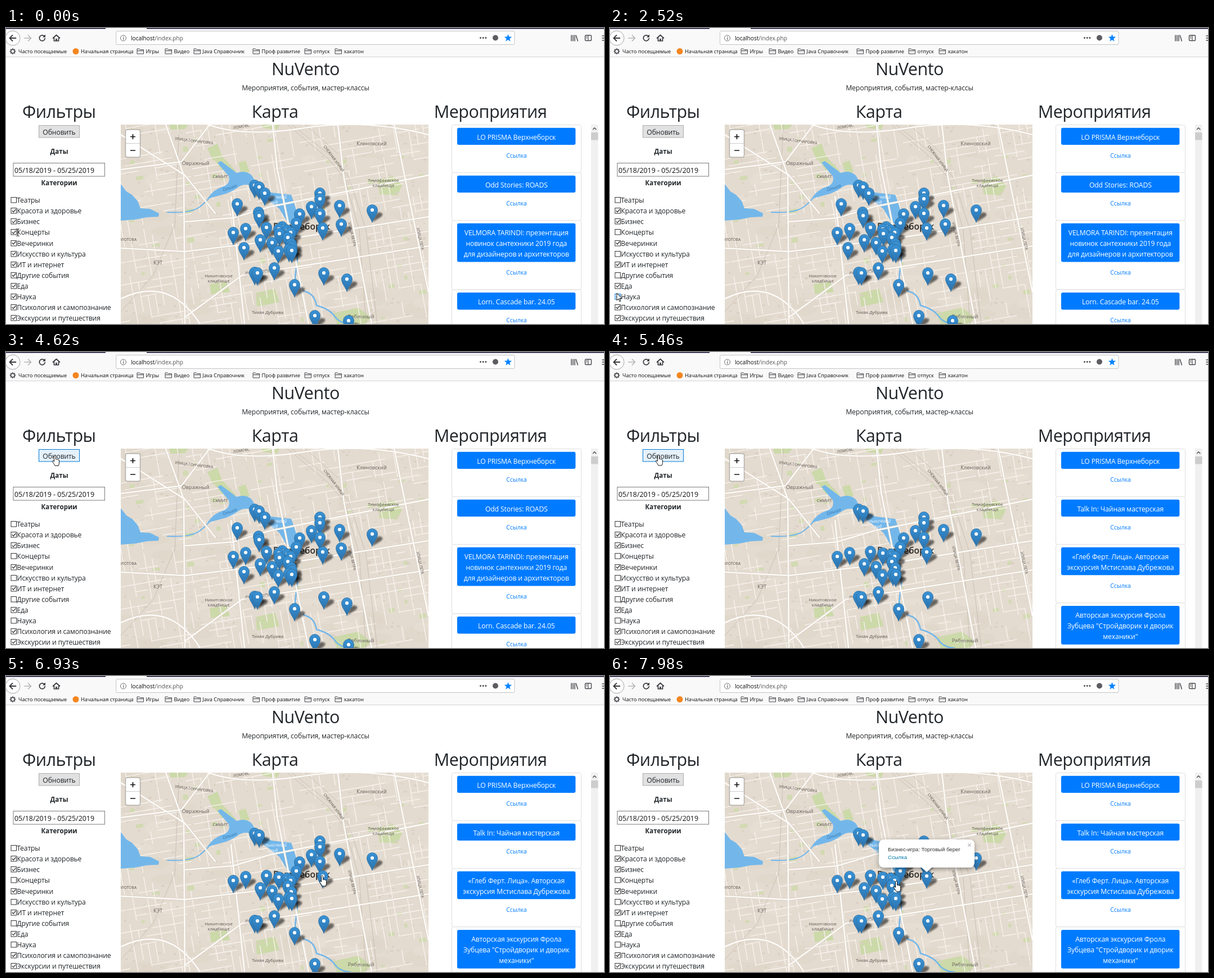
Animation of 1063 by 527 pixels, one loop 8000 ms. Source, as an HTML page:

```html
<!DOCTYPE html>
<html lang="ru">
<head>
<meta charset="utf-8">
<title>NuVento</title>
<style>
html, body { margin: 0; width: 100%; height: 100%; overflow: hidden; background: #fff; }
svg { display: block; font-family: "Open Sans", "Noto Sans", sans-serif; }
text { white-space: pre; }
.head { font-size: 30.5px; letter-spacing: -.5px; fill: #212529; }
.body { font-size: 12.2px; letter-spacing: -.13px; fill: #212529; }
.bold { font-size: 11.5px; font-weight: 700; fill: #212529; }
.date { font-size: 12.4px; fill: #111; }
.bar { font-size: 9.2px; fill: #0c0c0d; }
.url { font-size: 10.1px; fill: #555; }
.card { font-size: 12.2px; letter-spacing: -.13px; fill: #fff; }
.link { font-size: 10.4px; fill: #007bff; }
.place { font-size: 9.2px; fill: #66615c; }
.small { font-size: 7.9px; fill: #5c5751; }
.street { font-size: 6.7px; fill: #57514b; }
.water { font-size: 8.2px; font-style: italic; fill: #2f76b0; }
.pond { font-size: 8.4px; font-style: italic; fill: #eef7ff; }
.city { font-size: 15.5px; font-weight: 600; fill: #2a2826; }
.pop { font: 9.6px "Liberation Sans", Arial, sans-serif; fill: #333; }
.mid { text-anchor: middle; }
</style>
</head>
<body>
<svg id="stage" width="1063" height="527" viewBox="0 0 1063 527"></svg>
<script>
const LOOP = 8000, STEP = 70;

let seed = 41;
const rnd = () => (seed = (seed * 16807) % 2147483647) / 2147483647;
const span = (a, b) => a + rnd() * (b - a);
const times = (n, f) => Array.from({ length: n }, (_, i) => f(i)).join('');

const text = (x, y, cls, s, turn = 0) =>
  `<text class="${cls}" transform="translate(${x} ${y}) rotate(${turn})">${s}</text>`;
const rect = (x, y, w, h, attrs) => `<rect x="${x}" y="${y}" width="${w}" height="${h}" ${attrs}/>`;
const path = (d, attrs) => `<path d="${d}" ${attrs}/>`;
const line = (d, color, w) =>
  path(d, `fill="none" stroke="${color}" stroke-width="${w}" stroke-linecap="round" stroke-linejoin="round"`);

/* ---------- browser chrome ---------- */
function chrome() {
  const folder = (x, label) =>
    path(`M${x - 6} 37h4l1.5 1.5h6v7.5h-11.5zM${x - 6} 40.5h11.5`, 'fill="#eee" stroke="#4a4a4f"') +
    text(x + 9.5, 45, 'bar', label);
  const gear = times(8, i =>
    `<path d="M12 36.2v2" stroke="#4a4a4f" stroke-width="1.8" transform="rotate(${i * 45} 12 41.5)"/>`);
  const star = 'M' + Array.from({ length: 10 }, (_, i) => {
    const r = i % 2 ? 3 : 7, a = i * Math.PI / 5;
    return (892.5 + r * Math.sin(a)).toFixed(1) + ' ' + (18 - r * Math.cos(a)).toFixed(1);
  }).join('L') + 'Z';
  return rect(0, 0, 1063, 52, 'fill="#f9f9fa"') +
    rect(0, 0, 177, 1.5, 'fill="#0c0c2e"') + rect(250, 0, 813, 1.5, 'fill="#0c0c2e"') +
    rect(0, 51, 1063, 1, 'fill="#d4d4d6"') +
    '<circle cx="12" cy="18" r="13" fill="#fff" stroke="#a5a5a8"/>' +
    line('M17.5 18H7M11.5 13L6.5 18l5 5', '#38383d', 1.8) +
    line('M33 18H44M39.5 13L44.5 18l-5 5', '#b5b5b8', 1.7) +
    line('M68.2 14.6A5 5 0 1 0 69.3 18.6', '#38383d', 1.7) + path('M70 11.5v5h-5z', 'fill="#38383d"') +
    line('M83.5 18l6-5.5 6 5.5M85.5 18v5h8v-5', '#38383d', 1.7) +
    rect(88.2, 19, 2.6, 4, 'fill="#38383d"') +
    rect(195.5, 5.5, 708.5, 24, 'rx="2" fill="#fff" stroke="#c4c4c8"') +
    '<circle cx="208.5" cy="18" r="5" fill="none" stroke="#6a6a6f"/>' +
    rect(208, 17, 1.2, 4, 'fill="#6a6a6f"') + rect(208, 14.8, 1.2, 1.3, 'fill="#6a6a6f"') +
    text(222, 21.8, 'url', '<tspan fill="#0c0c0d">localhost</tspan>/index.php') +
    times(3, i => `<circle cx="${843.5 + i * 4.7}" cy="17.5" r="1.5" fill="#4a4a4f"/>`) +
    '<circle cx="870" cy="17.5" r="5" fill="#5c5c61"/>' +
    path(star, 'fill="#0a84ff"') +
    line('M1005 13v10M1008 13v10M1011 13v10M1013.3 13.3l3 9.7', '#4a4a4f', 1.5) +
    rect(1029.5, 13, 11, 9.5, 'rx="1.5" fill="none" stroke="#4a4a4f" stroke-width="1.4"') +
    line('M1035 13v9.5M1031.5 15.5h1.6M1031.5 18h1.6', '#4a4a4f', 1.1) +
    line('M1060 14h6M1060 18h6M1060 22h6', '#4a4a4f', 1.5) +
    gear + '<circle cx="12" cy="41.5" r="3.3" fill="none" stroke="#4a4a4f" stroke-width="1.6"/>' +
    text(22, 45, 'bar', 'Часто посещаемые') +
    '<circle cx="124" cy="41.5" r="5.5" fill="#f4861f"/>' +
    text(133, 45, 'bar', 'Начальная страница') +
    [[239, 'Игры'], [289, 'Видео'], [340, 'Java Справочник'], [445, 'Проф развитие'],
     [537, 'отпуск'], [591, 'хакатон']].map(f => folder(...f)).join('');
}

/* ---------- map ---------- */
const PINS = {
  stay: '442,280 450,283 558,294 558,304 543,318 593,316 651,324 522,331 558,330 516,347 563,356 ' +
    '404,364 426,357 463,355 485,358 506,364 500,360 452,377 473,382 501,373 507,384 503,394 484,397 ' +
    '508,396 477,427 442,435 447,436 513,457 565,436 549,512',
  extra: '460,294 411,313 596,349 449,328 450,334 491,354 486,366 508,389 423,391 606,447 609,521'
};

function pins() {
  const list = Object.keys(PINS).flatMap(kind =>
    PINS[kind].split(' ').map(p => ({ kind, at: p.split(',').map(Number) })));
  list.sort((a, b) => a.at[1] - b.at[1]);
  const put = id => list.map(p =>
    `<use href="#${id}" class="${p.kind}" x="${p.at[0]}" y="${p.at[1]}"/>`).join('');
  return put('shade') + put('pin');
}

function map() {
  const patches = times(70, () =>
    `<ellipse cx="${span(204, 751)}" cy="${span(172, 527)}" rx="${span(10, 35)}" ry="${span(5, 18)}"
      fill="${rnd() < .5 ? '#dfd5c9' : '#e9e1d8'}" opacity=".5"/>`);
  const greens = times(40, () => {
    const x = span(204, 745), y = span(172, 520);
    return rect(x, y, span(4, 15), span(3, 10), `rx="2" fill="#d2daB2" transform="rotate(-10 ${x} ${y})"`);
  });
  const houses = times(300, () => rect(span(204, 745), span(172, 522), span(2, 6), span(1.5, 4), 'fill="#dacfc3"'));
  const streets = 'M' + Array.from({ length: 620 }, () => {
    const x = 130 + 13 * Math.floor(span(0, 52)), y = 110 + 13 * Math.floor(span(0, 40));
    const len = Math.round(span(14, 62));
    return `${x} ${y}` + (rnd() < .5 ? `h${len}` : `v${len}`);
  }).join('M');
  const avenues = ['M284 172L316 262L318 527', 'M204 252L312 238L362 172', 'M318 345L404 338L470 318L751 262',
    'M204 392L318 398L500 376L751 336', 'M318 515L420 440L600 412L751 388', 'M474 172L482 250L538 527',
    'M590 172L600 262L650 527', 'M690 172L716 300L751 470', 'M360 172Q420 195 530 178T751 190',
    'M204 482Q290 440 345 527', 'M400 300L424 527', 'M204 190L318 262L372 330'].join('');
  const parks = ['M290 172h34l-6 8-26 1z', 'M358 214l18-8 8 22-16 8z', 'M413 240l13-4 7 20-14 6z',
    'M454 172h32l-4 9-26-3z', 'M660 270l28-6 16 16-8 18-32-2z', 'M444 472l34-8 8 24-40 8z',
    'M580 508l46-10 24 18-12 11h-50z', 'M362 456l30-4 6 18-34 4z',
    'M385 255l-16-22 14-6 26 28z'].map(d => path(d, 'fill="#ccd9a9"')).join('');
  const water =
    path('M204 278L214 291L224 297L234 308L239 321L256 322L272 330L271 336L250 337L230 341L204 343Z', 'fill="#73b7ea"') +
    line('M287 328Q330 330 345 318T366 296', '#73b7ea', 2.2) +
    path('M358 304Q368 288 384 283T396 264L376 240L382 237L410 258Q428 252 438 264L446 280L472 293L507 297Q515 318 522 345L510 352L498 342L486 322L466 306L450 296L440 284Q426 274 412 284T384 297Z', 'fill="#73b7ea"') +
    line('M512 350L518 410L514 445Q520 466 534 470T552 494Q575 500 584 513T612 527', '#73b7ea', 2.6);
  const rails = ['M500 172L572 232L602 268L628 360L640 527', 'M508 172L578 228L610 266L640 360L660 527',
    'M532 172L590 224', 'M204 505L262 440L300 350L308 172'].join('');
  const labels =
    text(300, 199, 'street', 'УЛИЦА ГОНЧАРОВКА', 7) + text(404, 180, 'street', 'ЛОМОВС', -9) +
    text(200, 379, 'street', 'ОЛОТОВА') + text(425, 439, 'street', 'ЛУГОВАЯ УЛИЦА', -6) +
    text(564, 211, 'street', 'СНЕЖНАЯ УЛИЦА', 53) + text(608, 346, 'street', 'УЛИЦА ВЕТРА', 77) +
    text(730, 356, 'street', 'УЛИЦА ЛЕТА', 78) +
    text(650, 209, 'place mid', 'Кленовский') + text(337, 244, 'place mid', 'Овражный') +
    text(381, 267, 'small mid', 'СвМИТ') +
    text(671, 274, 'small mid', 'Тимофеевское') + text(671, 283, 'small mid', 'кладбище') +
    text(270, 421, 'place mid', 'КЭТ') +
    text(378, 444, 'small mid', 'Никитовское') + text(378, 453, 'small mid', 'кладбище') +
    text(465, 509, 'small mid', 'Тихая Дубрава') + text(631, 517, 'place mid', 'Рябинный') +
    text(386, 291, 'water', 'Ольша', -18) +
    text(474, 304, 'pond mid', 'Мельничный') + text(474, 314, 'pond mid', 'пруд') +
    text(475, 359, 'city', 'Верхнеборск');
  const zoom = rect(212.5, 181, 26, 49, 'rx="3" fill="#fff" stroke="#000" stroke-opacity=".25" stroke-width="1.6"') +
    rect(213, 205, 25, 1, 'fill="#ccc"') +
    path('M221 193.5h9M225.5 189v9M221 218h9', 'stroke="#111" stroke-width="1.7"');
  return `<g clip-path="url(#mapArea)">` + rect(204, 172, 547, 355, 'fill="#e4dbd0"') +
    patches + greens + parks + houses +
    `<g transform="rotate(-10 477 350)">${line(streets, '#f8f4ef', 1.3)}</g>` +
    line(rails, '#c3b9ae', .8) + water + line(avenues, '#d6cbbe', 3.8) + line(avenues, '#fdfbf8', 2.7) +
    labels + pins() + zoom + popup() + '</g>';
}

function popup() {
  return `<g id="popup"><g filter="url(#soft)">` +
    path('M488 291H638Q648 291 648 301V331Q648 341 638 341H572L563 349L554 341H488Q478 341 478 331V301Q478 291 488 291Z', 'fill="#fff"') +
    '</g>' + text(494, 312, 'pop', 'Бизнес-игра: Торговый берег') +
    text(494, 325.5, 'pop', '<tspan fill="#0078a8">Ссылка</tspan>') +
    path('M636.3 298.3l5.4 5.4M641.7 298.3l-5.4 5.4', 'stroke="#c0c0c0" stroke-width="1.5"') + '</g>';
}

/* ---------- event cards ---------- */
const FIRST = ['LO PRISMA Верхнеборск'];
const BEFORE = [FIRST, ['Odd Stories: ROADS'],
  ['VELMORA TARINDI: презентация', 'новинок сантехники 2019 года', 'для дизайнеров и архитекторов'],
  ['Lorn. Cascade bar. 24.05']];
const AFTER = [FIRST, ['Talk In: Чайная мастерская'],
  ['«Глеб Ферт. Лица». Авторская', 'экскурсия Мстислава Дубрежова'],
  ['Авторская экскурсия Фрола', 'Зубцева "Стройдворик и дворик', 'механики"']];
const LEAD = 19.2;

function cards(id, list) {
  let y = 172.5;
  return `<g id="${id}">` + list.map(lines => {
    const h = 11.2 + LEAD * lines.length, top = y + 5.2;
    const out = rect(792.5, y, 230, h + 54.6, 'rx="3" fill="#fff" stroke="#dfdfdf"') +
      rect(802, top, 210.4, h, 'rx="3" fill="#007bff"') +
      lines.map((s, i) => text(907.3, top + 20.8 + i * LEAD, 'card mid', s)).join('') +
      text(907.5, top + h + 22.8, 'link mid', 'Ссылка');
    y += h + 54.6;
    return out;
  }).join('') + '</g>';
}

/* ---------- filters ---------- */
const TOPICS = ['Театры', 'Красота и здоровье', 'Бизнес', 'Концерты', 'Вечеринки', 'Искусство и культура',
  'ИТ и интернет', 'Другие события', 'Еда', 'Наука', 'Психология и самопознание', 'Экскурсии и путешествия'];
const CLEARED = { 0: 0, 3: 350, 5: 1190, 7: 1960, 9: 2800 };
const rowY = i => 306.2 + 19.08 * i;

function filters() {
  return rect(58.5, 173.5, 72, 21.5, 'id="button"') + text(94.5, 189.5, 'body mid', 'Обновить') +
    text(94.5, 224, 'bold mid', 'Даты') +
    rect(13, 240.5, 162.5, 23.5, 'id="input" fill="#fff"') +
    text(15, 258, 'date', '05/18/2019 - 05/25/2019') +
    text(94.5, 279.5, 'bold mid', 'Категории') +
    TOPICS.map((s, i) => `<g class="box" stroke="#333">` +
      rect(9, Math.round(rowY(i)) - 4.5, 9.5, 9.5, 'fill="#fff"') +
      `<path class="tick" d="M10.8 ${rowY(i)}l2.4 2.5 4-5" fill="none" stroke-width="1.3"/></g>` +
      text(19.3, rowY(i) + 5, 'body', s)).join('');
}

/* ---------- pointer ---------- */
const SHAPES = {
  arrow: 'M0 0V13L3 10.2L5 15L7 14.2L5 9.5H9Z',
  beam: 'M-2.5-6.5Q0-6.5 0-5.3Q0-6.5 2.5-6.5M0-5.3V5.3M-2.5 6.5Q0 6.5 0 5.3Q0 6.5 2.5 6.5',
  hand: 'M-1.5 1Q-1.5-.5 0-.5T1.5 1V7Q3 6 3.6 7.4Q5 6.6 5.6 8Q7.2 7.4 7.5 9V13Q7.5 16 6.2 18.5H0Q-1 16-4 12Q-5.2 10-4 9.4Q-3 9.2-1.5 11Z',
  grab: 'M-5 8Q-6 5.5-4 5.5L-3 7V2Q-1.8.8-1 2V1Q.3-.6 1 1V2Q2.3.4 3 2.2V4Q4.4 2.6 5 4.4V10Q5 13 3.5 16H-2Q-3 13-5 8Z'
};
// time, x, y, shape from here on
const TRACK = [
  [0, 21, 364, 'beam'], [70, 21, 364], [140, 15, 364, 'arrow'], [210, 13, 363], [350, 13, 363], [490, 10, 351],
  [630, 1, 370], [910, 13, 404.5], [1260, 13, 404.5], [1400, 2, 425], [1610, 13, 447], [1750, 13, 447],
  [1820, 15, 445], [1960, 15, 445], [2170, 6, 449], [2520, 12, 472], [2730, 11, 476], [2940, 11, 476],
  [3220, 40, 400], [3570, 88, 264, 'beam'], [3640, 91, 261], [3710, 91, 261], [3920, 91, 256],
  [4130, 91, 256], [4340, 90, 230, 'arrow'], [4480, 88, 195, 'hand'], [4620, 87, 184], [5110, 87, 184],
  [5180, 86, 183.5], [5880, 86, 183.5], [5950, 118, 196, 'arrow'], [6090, 225, 230, 'grab'],
  [6370, 584, 342], [6440, 584, 342], [6720, 562, 355.5, 'hand'], [7700, 562, 355.5], [7980, 509, 365.5],
  [LOOP, 509, 365.5]];

function pointer(t) {
  const i = TRACK.findIndex(k => k[0] > t) - 1;
  const a = TRACK[i], b = TRACK[i + 1];
  const f = (t - a[0]) / (b[0] - a[0]);
  const shape = TRACK.slice(0, i + 1).reverse().find(k => k[3])[3];
  return { x: a[1] + (b[1] - a[1]) * f, y: a[2] + (b[2] - a[2]) * f, shape };
}

/* ---------- assembly ---------- */
const stage = document.getElementById('stage');
stage.innerHTML = `<defs>
  <clipPath id="mapArea"><rect x="204" y="172" width="547" height="355"/></clipPath>
  <linearGradient id="blue" x2="0" y2="1"><stop stop-color="#3a93d6"/><stop offset="1" stop-color="#2a70ab"/></linearGradient>
  <filter id="blur" x="-50%" y="-50%" width="200%" height="200%"><feGaussianBlur stdDeviation="1.6"/></filter>
  <filter id="soft" x="-10%" y="-20%" width="120%" height="150%"><feDropShadow dx="0" dy="2.5" stdDeviation="4" flood-opacity=".4"/></filter>
  <g id="shade"><path d="M0 22L5 10Q10 2 16 5T13 14Z" fill="#000" opacity=".55" filter="url(#blur)"/></g>
  <g id="pin"><path d="M0 22.3C-2 15-9.5 8.5-9.5 0A9.5 9.5 0 0 1 9.5 0C9.5 8.5 2 15 0 22.3Z" fill="url(#blue)" stroke="#2c6f9f" stroke-width=".8"/><circle r="3.1" fill="#fff"/></g>
</defs>` + rect(0, 0, 1063, 527, 'fill="#fff"') + chrome() +
  text(532.5, 84, 'head mid', 'NuVento') +
  text(532.5, 111, 'body mid', 'Мероприятия, события, мастер-классы') +
  text(94.3, 160, 'head mid', 'Фильтры') + text(478, 160, 'head mid', 'Карта') +
  text(861, 160, 'head mid', 'Мероприятия') +
  filters() + map() + cards('before', BEFORE) + cards('after', AFTER) +
  rect(1040, 172, 12.5, 355, 'fill="#f0f0f0"') + rect(1040, 186, 12.5, 13.5, 'fill="#cdcdcd"') +
  line('M1043.5 180.5l2.7-2.7 2.7 2.7', '#505050', 1.4) +
  '<path id="pointer" stroke="#000" stroke-linejoin="round"/>';

const $ = id => document.getElementById(id);
const boxes = [...stage.querySelectorAll('.box')];
const extras = [...stage.querySelectorAll('.extra')];
const show = (el, on) => { el.style.display = on ? '' : 'none'; };
const paint = (el, fill, stroke) => { el.setAttribute('fill', fill); el.setAttribute('stroke', stroke); };
const inside = (p, x, y, w, h) => p.x >= x && p.x <= x + w && p.y >= y && p.y <= y + h;

function render(time) {
  const t = Math.floor(time / STEP) * STEP;
  const p = pointer(t), cur = $('pointer');
  cur.setAttribute('d', SHAPES[p.shape]);
  cur.setAttribute('fill', p.shape === 'beam' ? 'none' : '#fff');
  cur.setAttribute('stroke-width', p.shape === 'beam' ? 1 : .9);
  cur.setAttribute('transform', `translate(${p.x.toFixed(1)} ${p.y.toFixed(1)})`);

  boxes.forEach((box, i) => {
    show(box.querySelector('.tick'), !(t >= CLEARED[i]));
    box.setAttribute('stroke', inside(p, 9, rowY(i) - 7, 10, 14) ? '#0078d7' : '#333');
  });
  paint($('input'), '#fff', inside(p, 13, 240, 163, 24) ? '#171717' : '#7a7a7a');

  const over = inside(p, 58, 173, 73, 23), focus = t >= 4970 && t < 6860;
  if (t >= 4970 && t < 5110) paint($('button'), '#cce4f7', '#005499');
  else paint($('button'), over ? '#e5f1fb' : '#e1e1e1', over || focus ? '#0078d7' : '#adadad');

  const updated = t >= 5460;
  extras.forEach(e => show(e, !updated));
  show($('before'), !updated);
  show($('after'), updated);
  $('popup').style.opacity = Math.max(0, Math.min(1, (t - 6930) / 280));
}

function tick() {
  render(performance.now() % LOOP);
  requestAnimationFrame(tick);
}
tick();
</script>
</body>
</html>
```
